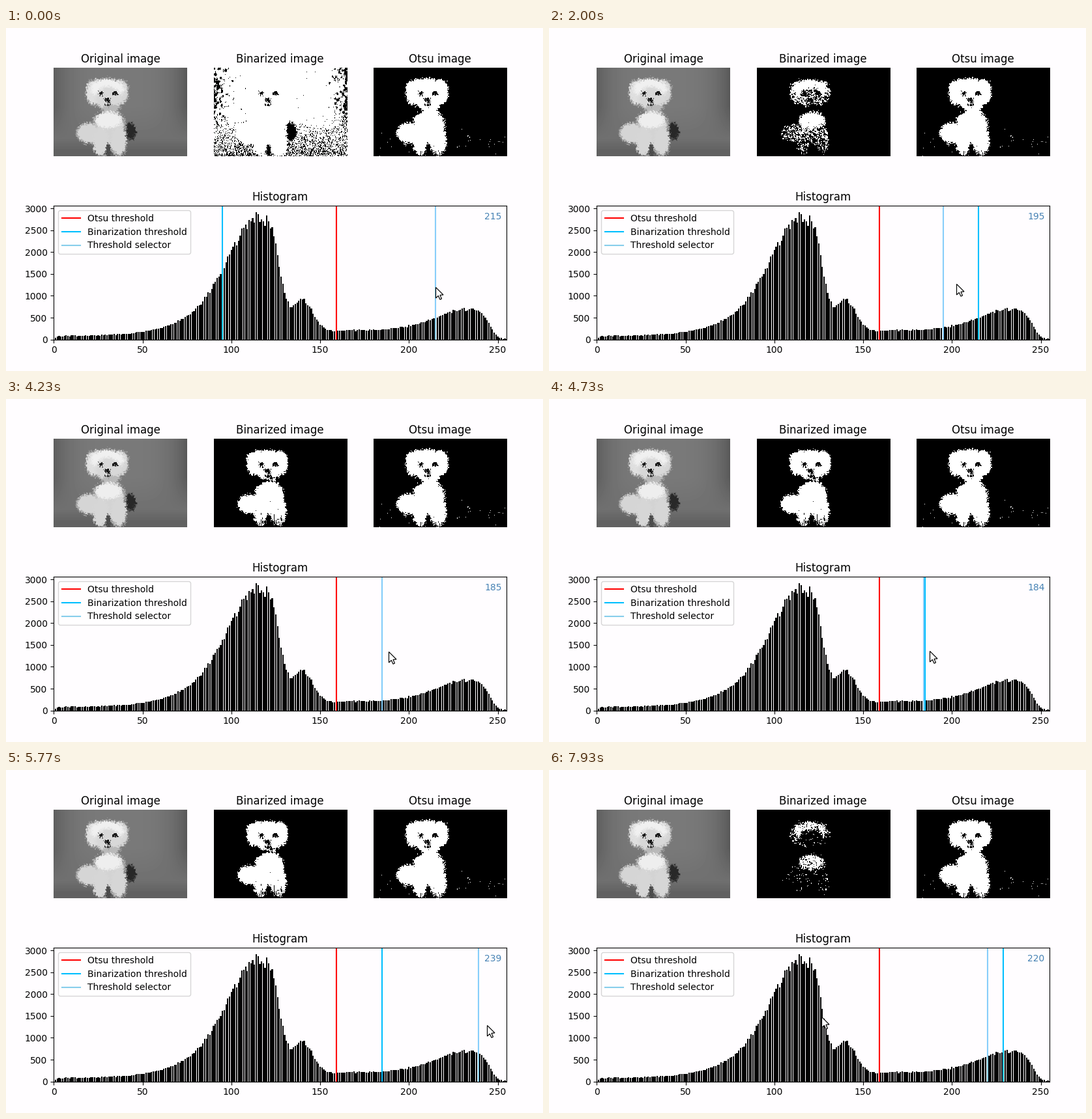
Write a matplotlib script that moves like this. It is 824 px wide and 527 px high and loops after 8 s.

```python
import numpy as np
import matplotlib.pyplot as plt
from matplotlib.animation import FuncAnimation
from matplotlib.collections import PolyCollection
from matplotlib.patches import Polygon

W, H = 824, 527
LEFT, RIGHT, TOP, BOTTOM = 73.3, 768.2, 26.3, 478.7
IMG_W, IMG_H = 205, 136
FPS, FRAMES = 30, 240
PAPER = "#fffdff"
OTSU, FIRST_LEVEL = 159, 95

# Pointer gestures: start ms, end ms and the spot reached.
HOME = np.array([659.0, 398.0])
GESTURES = [
    (900, 1450, (604.5, 394)),
    (1700, 2000, (625, 393)),
    (2100, 2500, (578.5, 391)),
    (3550, 4200, (587, 388)),
    (4200, 4400, (575, 386)),
    (4500, 5000, (599.5, 388)),
    (5000, 5300, (719, 388)),
    (5300, 5800, (738, 392)),
    (5950, 6300, (698, 394)),
    (7300, 7600, (673, 394)),
    (7800, 7900, (418, 379)),
]
# The selector follows the pointer only at these moments, a little late;
# a click copies the selector's level to the binarization threshold.
REFRESHES = (1800, 2200, 3070, 4570, 4870, 5130, 5670, 6070, 6700, 7900)
CLICKS = (1470, 3930, 7400)
LAG = 130

rng = np.random.default_rng(7)
yy, xx = np.mgrid[:IMG_H, :IMG_W].astype(float)


def pointer_at(t):
    t = (t + 30) // 100 * 100  # the screen is sampled about ten times a second
    spot = HOME.copy()
    for start, end, goal in GESTURES:
        u = np.clip((t - start) / (end - start), 0, 1)
        spot += (np.array(goal) - spot) * u * u * (3 - 2 * u)
    return spot


def selector_at(t):
    last = max((r for r in REFRESHES if r <= t), default=0)
    x = pointer_at(last - LAG)[0]
    return round(255 * (x - LEFT) / (RIGHT - LEFT))


def chosen_at(t):
    clicks = [c for c in CLICKS if c <= t]
    return selector_at(clicks[-1]) if clicks else FIRST_LEVEL


def noise(width, height):
    """Unit-variance noise smoothed by a box of the given size."""
    field = rng.normal(size=(IMG_H, IMG_W))
    for axis, n in ((1, width), (0, height)):
        field = np.apply_along_axis(np.convolve, axis, field, np.ones(n) / n, "same")
    return field / field.std()


warp_x, warp_y = xx + noise(2, 2) * 1.2, yy + noise(2, 2) * 1.2


def blob(cx, cy, rx, ry):
    dist = np.hypot((warp_x - cx) / rx, (warp_y - cy) / ry)
    return np.clip((1 - dist) / 0.25, 0, 1)


def make_scene():
    """Soft tones of a white dog on grass, plus a grainy copy to threshold."""
    low = np.clip((yy - 60) / 50, 0, 1)
    floor = np.clip((yy - 108) / 20, 0, 1)
    side = np.abs(xx - 100) / 104
    tone = 121 - 32 * side ** 4 * (1 - low) - 9 * low - 15 * floor
    grain = noise(3, 4) * 9 * (1 - low) + noise(1, 2) * 22 * low
    cover = np.zeros_like(tone)

    def paint(value, *shape):
        mask = blob(*shape)
        tone[:] += (value - tone) * mask
        return mask

    grain *= 1 - 0.7 * paint(40, 117, 97, 10, 15)

    coat = [(213, 53, 100, 20, 18), (212, 87, 96, 26, 36)]
    coat += [(214, 86 + s * 14, 114, 13, 24) for s in (-1, 1)]
    coat += [(238, 83, 80, 24, 14)]
    coat += [(218 - 5 * s, 82 + s * 20, 38, 14, 22) for s in (-1, 1)]
    coat += [(240, 82, 33, 29, 18), (216, 83, 48, 22, 21), (185, 88, 62, 16, 5)]
    for shape in coat:
        cover = np.maximum(cover, paint(*shape))
    paint(75, 83, 126, 5, 11)

    streaks = noise(1, 9) * 40 * floor
    grain += cover * (noise(2, 2) * 9 + np.minimum(streaks, 0) - grain)
    features = [(25, 83 + s * 10.5, 40, 4, 3.4) for s in (-1, 1)]
    features += [(20, 83, 50, 5, 4), (65, 83, 58, 5, 2)]
    for shape in features:
        grain *= 1 - paint(*shape)
    return tone, tone + grain


def bell(x, center, width, power=2):
    return np.exp(-(np.abs(x - center) / width) ** power)


def make_counts():
    """Grass peak with a shoulder, and a lower hump for the white coat."""
    x = np.arange(256)
    rise = 1 / np.cosh((114 - x) / 16.1)
    fall = bell(x, 114, 15, 4)
    counts = 75 * np.clip((x + 1) / 4, 0, 1) + 2680 * np.where(x < 114, rise, fall)
    counts += 810 * bell(x, 139.5, 9) + 470 * bell(x, 234, 26)
    counts += 150 / (1 + np.exp((150 - x) / 8))
    counts /= 1 + np.exp((x - 246) / 2.2)
    counts *= 1 + rng.uniform(-0.05, 0.05, 256)
    counts += rng.uniform(-12, 12, 256)
    counts[114] = 2914
    return x, np.maximum(counts, 10)


tone, grainy = make_scene()

plt.rcParams["font.family"] = "DejaVu Sans"
fig = plt.figure(figsize=(W / 100, H / 100), dpi=100, facecolor=PAPER)
fig.subplots_adjust(left=LEFT / W, right=RIGHT / W, top=1 - TOP / H,
                    bottom=1 - BOTTOM / H, wspace=0.2, hspace=0.2)


def add_image(column, title, data, top):
    ax = fig.add_subplot(2, 3, column)
    ax.set_title(title)
    view = ax.imshow(data, cmap="gray", vmin=0, vmax=top,
                     interpolation="nearest", extent=(0, 3, 0, 2))
    ax.axis("off")
    return view


add_image(1, "Original image", tone, 255)
binary_view = add_image(2, "Binarized image", grainy > FIRST_LEVEL, 1)
add_image(3, "Otsu image", grainy > OTSU, 1)

ax = fig.add_subplot(2, 1, 2, facecolor=PAPER)
ax.set(title="Histogram", xlim=(0, 255), ylim=(0, 3060))
bars = [[(x - 0.4, 0), (x - 0.4, y), (x + 0.4, y), (x + 0.4, 0)]
        for x, y in zip(*make_counts())]
ax.add_collection(PolyCollection(bars, facecolor="black", edgecolor="none",
                                 linewidth=0, snap=True), autolim=False)

ax.axvline(OTSU, color="red", label="Otsu threshold")
chosen_line = ax.axvline(FIRST_LEVEL, color="deepskyblue",
                         label="Binarization threshold")
selector_line = ax.axvline(215, color="lightskyblue", label="Threshold selector")
legend = ax.legend(loc="upper left")
legend.get_lines()[2].set_color("skyblue")
readout = fig.text(760.5 / W, 1 - 289.5 / H, "", color="steelblue",
                   ha="right", va="center")

# The pointer lives on a pixel-sized overlay with y pointing down.
overlay = fig.add_axes([0, 0, 1, 1])
overlay.set(xlim=(0, W), ylim=(H, 0))
overlay.axis("off")
ARROW = np.array([(0.5, 0.5), (0.5, 17), (4.3, 13.4), (7, 19.2), (9.5, 18),
                  (7, 12.4), (12, 12)])
pointer = overlay.add_patch(Polygon(ARROW, facecolor="white", edgecolor="black",
                                    linewidth=0.85, joinstyle="miter"))


def update(frame):
    t = round(frame * 1000 / FPS, -1)
    chosen, selected = chosen_at(t), selector_at(t)
    binary_view.set_data(grainy > chosen)
    chosen_line.set_xdata([chosen, chosen])
    selector_line.set_xdata([selected, selected])
    readout.set_text(str(selected))
    pointer.set_xy(ARROW + np.round(pointer_at(t)))
    return binary_view, chosen_line, selector_line, readout, pointer


anim = FuncAnimation(fig, update, frames=FRAMES, interval=1000 / FPS,
                     repeat=True, repeat_delay=0)
plt.show()
```
